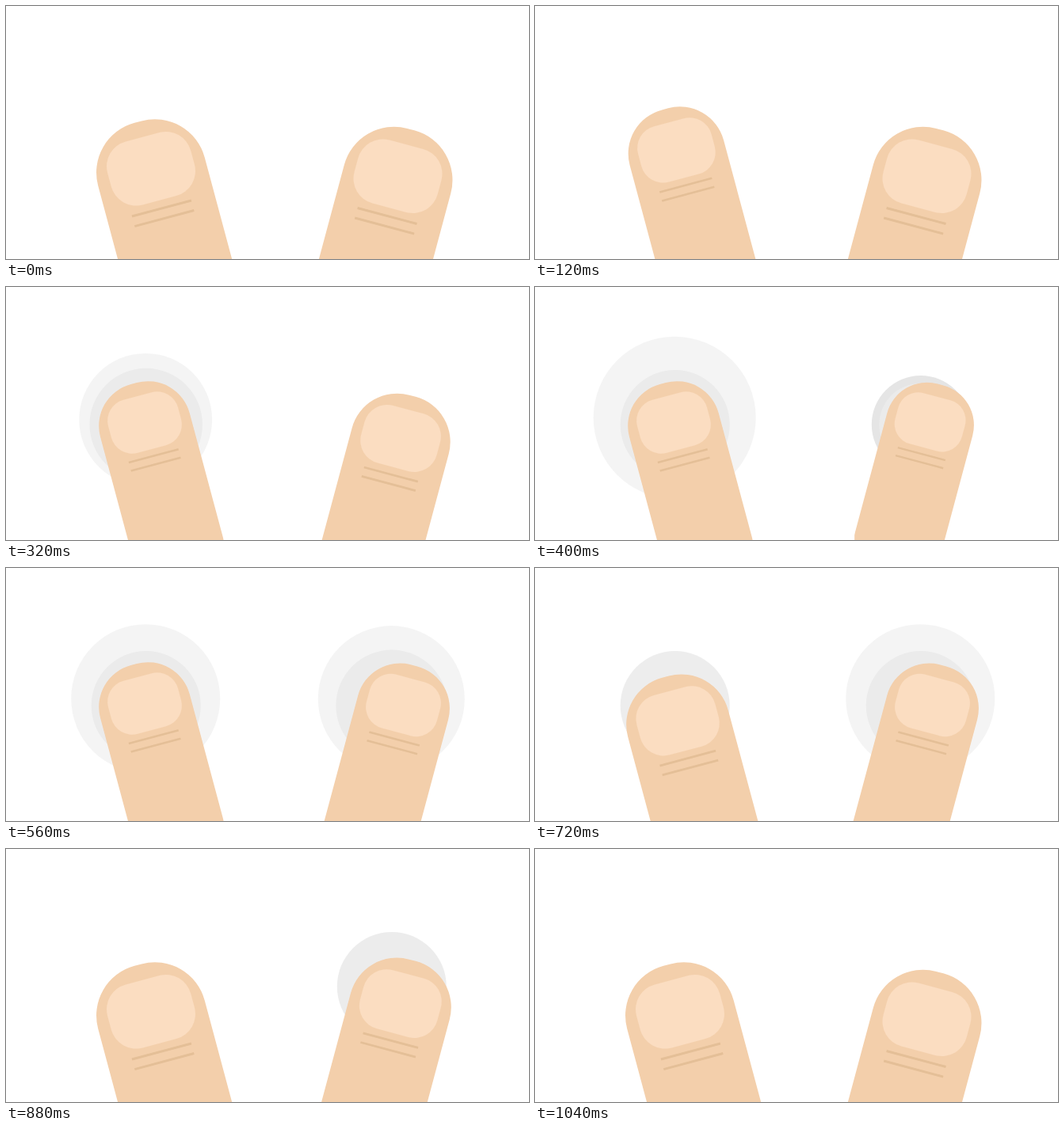
An HTML page for the animation above (1080 ms loop, 660 px wide and 320 px high).

```html
<!DOCTYPE html>
<html lang="en">
<head>
<meta charset="utf-8">
<title>Two thumbs tapping</title>
<style>
  html, body { margin: 0; width: 100%; height: 100%; overflow: hidden; background: #fff; }
  svg { display: block; width: 660px; height: 320px; }
</style>
</head>
<body>
<svg viewBox="0 0 660 320">
  <defs>
    <clipPath id="side"><rect x="-300" y="-300" width="419" height="900"/></clipPath>
    <!-- Origin is the centre of the nail -->
    <g id="thumb" clip-path="url(#side)">
      <g transform="rotate(-15)">
        <rect x="-70.1" y="-61.3" width="139.2" height="420" rx="65" fill="#f3cfab"/>
        <rect x="-54.4" y="-41.4" width="108.8" height="82.8" rx="32.4" fill="#fbddc1"/>
        <path d="M-38.8 52h77.6M-38.8 65h77.6" stroke="#e4bf97" stroke-width="3"/>
      </g>
    </g>
  </defs>
  <g id="stage"></g>
</svg>
<script>
const LOOP = 1080, STEP = 40;
const NS = 'http://www.w3.org/2000/svg';
const stage = document.getElementById('stage');

// Tables of [time, value], in the time of a single tap
const DISC_R = [[110, 0], [190, 62], [240, 67], [300, 71.7], [350, 70.4], [400, 69]];
const DISC_ALPHA = [[580, 1], [700, 0.73], [720, 0.69], [840, 0]];
const RIPPLE_R = [[120, 0], [190, 52], [240, 61], [350, 92.5], [400, 102.5], [440, 104], [510, 94]];
const RIPPLE_ALPHA = [[570, 0.65], [670, 0]];
const OVERSHOOT = [[100, 0], [180, 1], [200, 0.92], [240, 0.27], [290, 0]];

const sides = [
  { flip: 1, rest: [183, 205.75], down: [175, 171.5], scale: 0.838, cx: 176.7, pressLag: 0, liftLag: 0 },
  { flip: -1, rest: [494.5, 215.25], down: [501.5, 173.5], scale: 0.847, cx: 486.8, pressLag: 210, liftLag: 180 }
];

const clamp = x => Math.min(1, Math.max(0, x));
const mix = (a, b, k) => a + (b - a) * k;
const ease = (t, from, to) => (1 - Math.cos(Math.PI * clamp((t - from) / (to - from)))) / 2;

function sample(table, t) {
  if (t <= table[0][0]) return table[0][1];
  for (let i = 1; i < table.length; i++) {
    const [t0, a] = table[i - 1], [t1, b] = table[i];
    if (t < t1) return mix(a, b, (t - t0) / (t1 - t0));
  }
  return table[table.length - 1][1];
}

function add(name, attrs) {
  const node = document.createElementNS(NS, name);
  set(node, attrs);
  return stage.appendChild(node);
}

function set(node, attrs) {
  for (const key in attrs) node.setAttribute(key, attrs[key]);
}

for (const s of sides) {
  s.disc = add('circle', { cx: s.cx, cy: 174, fill: '#e5e5e5' });
  s.ripple = add('circle', { cx: s.cx - 0.5, fill: '#eee' });
}
for (const s of sides) s.thumb = add('use', { href: '#thumb' });

function draw(s, time) {
  const t = time - s.pressLag, lift = time - s.liftLag;
  const press = ease(t, 28, 180) * (1 - ease(lift, 555, 835));
  const over = sample(OVERSHOOT, t);
  const x = mix(s.rest[0], s.down[0], press) + 3 * s.flip * over;
  const y = mix(s.rest[1], s.down[1], press) - 2.75 * over;
  const scale = mix(1, s.scale, press) - 0.047 * over;
  set(s.thumb, { transform: `translate(${x} ${y}) scale(${scale * s.flip} ${scale})` });

  set(s.disc, { r: sample(DISC_R, t), opacity: sample(DISC_ALPHA, lift) });
  const r = sample(RIPPLE_R, t);
  set(s.ripple, { r, cy: 174 - 8.8 * clamp((r - 61) / 33), opacity: sample(RIPPLE_ALPHA, lift) });
}

const start = performance.now();
function frame() {
  const elapsed = (performance.now() - start) % LOOP;
  const time = Math.floor(elapsed / STEP) * STEP;
  for (const s of sides) draw(s, time);
  requestAnimationFrame(frame);
}
frame();
</script>
</body>
</html>
```
